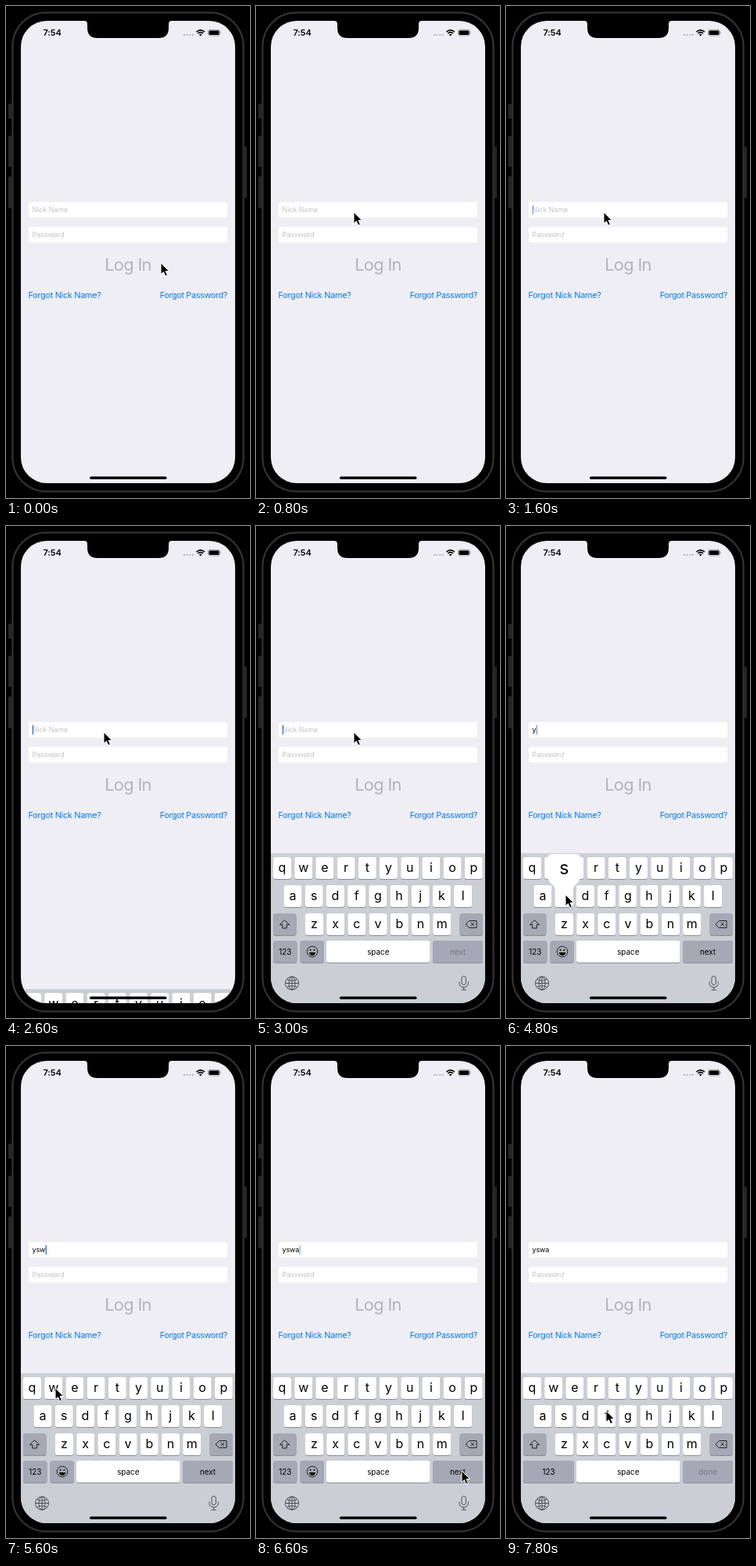
Recreate the animation shown at these times as an HTML page. Size 312x630 px, loop 8000 ms.

```html
<!DOCTYPE html>
<html lang="en">
<head>
<meta charset="utf-8">
<title>Login form</title>
<style>
  html, body { margin: 0; width: 100%; height: 100%; overflow: hidden; background: #000; }
  svg { display: block; width: 312px; height: 630px; }
  text { font-family: Inter, Roboto, "Liberation Sans", sans-serif; }
  .hint { font-size: 9px; letter-spacing: -.1px; fill: #c3c3c6; }
  .link { font-size: 10.9px; letter-spacing: -.37px; fill: #0a7aed; }
  .key { font-size: 16px; text-anchor: middle; }
  .word { font-size: 9.9px; text-anchor: middle; }
  .line { fill: none; stroke: #4c4f55; stroke-width: 1; }
</style>
</head>
<body>
<svg viewBox="0 0 312 630">
  <defs>
    <clipPath id="glass"><rect x="19" y="19" width="274" height="592" rx="33"/></clipPath>
  </defs>
  <rect width="312" height="630"/>

  <!-- phone body -->
  <g fill="#252525">
    <rect x="3" y="125" width="6" height="19" rx="1"/>
    <rect x="3" y="166" width="6" height="40" rx="1"/>
    <rect x="3" y="218" width="6" height="41" rx="1"/>
    <rect x="302" y="180" width="6" height="66" rx="1"/>
  </g>
  <rect x="7" y="7" width="298" height="616" rx="44" fill="#191919"/>
  <rect x="8.5" y="8.5" width="295" height="613" rx="43" fill="#000" stroke="#333" stroke-width="2"/>

  <g clip-path="url(#glass)">
    <rect x="19" y="19" width="274" height="592" fill="#efeef4"/>
    <path d="M100 19Q104 19 104 23V28Q104 41 117 41H195Q208 41 208 28V23Q208 19 212 19Z"/>

    <!-- status bar -->
    <text x="47.5" y="38.3" font-size="11" font-weight="600" letter-spacing="-.1">7:54</text>
    <g fill="#aaa9ae">
      <circle cx="228" cy="37" r="1.1"/><circle cx="231.6" cy="37" r="1.1"/>
      <circle cx="235.2" cy="37" r="1.1"/><circle cx="238.8" cy="37" r="1.1"/>
    </g>
    <g fill="none" stroke="#000" stroke-width="1.6">
      <path d="M243.5 33.2Q248.7 28.6 253.9 33.2"/>
      <path d="M245.3 35.2Q248.7 32.2 252.1 35.2"/>
    </g>
    <path d="M246.8 36.6Q248.7 35 250.6 36.6L248.7 38.6Z"/>
    <rect x="258.5" y="30.5" width="15" height="7.6" rx="2.2" fill="none" stroke="#8b8b8f" stroke-width=".8"/>
    <rect x="259.5" y="31.5" width="13" height="5.6" rx="1.3"/>
    <path d="M274.7 33Q276 34.3 274.7 35.6Z" fill="#8b8b8f"/>

    <!-- form -->
    <rect x="29" y="251" width="254" height="20" rx="3.2" fill="#fff"/>
    <rect x="29" y="283" width="254" height="20" rx="3.2" fill="#fff"/>
    <text id="hint" class="hint" x="33.5" y="264.3">Nick Name</text>
    <text class="hint" x="33.5" y="296.3">Password</text>
    <text id="entry" x="33.5" y="264.3" font-size="9" letter-spacing="-.1"></text>
    <rect id="caret" width="1.4" height="12" rx=".5" fill="#3f6fd8"/>
    <text x="156" y="339.3" font-size="21.8" letter-spacing="-.65" text-anchor="middle" fill="#b4b3b8">Log In</text>
    <text class="link" x="28.5" y="373.5" style="letter-spacing: -.3px">Forgot Nick Name?</text>
    <text class="link" x="283" y="373.5" text-anchor="end">Forgot Password?</text>

    <g id="board">
      <rect x="19" y="419" width="274" height="200" fill="#cbced5"/>
      <g id="keys"></g>
      <!-- shift and delete -->
      <path class="line" stroke-linejoin="round" d="M36.5 504.5L42.5 510.5H39.3V515H33.7V510.5H30.5Z" style="stroke:#222"/>
      <path class="line" stroke-linejoin="round" d="M272.5 505.5H282V514.5H272.5L268 510ZM274.5 507.8L279 512.2M279 507.8L274.5 512.2" style="stroke:#222"/>
      <g id="emoji">
        <circle class="line" cx="72" cy="545" r="6.8" style="stroke:#222"/>
        <circle cx="69.6" cy="543" r="1"/><circle cx="74.4" cy="543" r="1"/>
        <path d="M67.8 546H76.2Q75.4 550 72 550T67.8 546Z"/>
      </g>
      <g class="line">
        <circle cx="46" cy="585.5" r="8.5"/>
        <ellipse cx="46" cy="585.5" rx="4" ry="8.5"/>
        <path d="M46 577V594M37.5 585.5H54.5M39.5 580.5Q46 584 52.5 580.5M39.5 590.5Q46 587 52.5 590.5"/>
      </g>
      <g id="mic" class="line">
        <rect x="263" y="576.5" width="5.4" height="11" rx="2.7"/>
        <path d="M260 583.5V585.5Q260 590.5 265.7 590.5T271.4 585.5V583.5M265.7 590.5V594M262.5 594H269"/>
      </g>
      <g id="popup">
        <path id="bubble" fill="#fff"/>
        <text id="big" font-size="23" text-anchor="middle"></text>
      </g>
    </g>
    <rect x="107" y="602.5" width="98.5" height="3.4" rx="1.7"/>
  </g>

  <path id="pointer" d="M0 0V14.6L3.4 11.6L5.7 16.8L8.4 15.6L6.1 10.6H10.6Z"
        stroke="#fff" stroke-width="1" stroke-linejoin="round"/>
</svg>

<script>
const $ = id => document.getElementById(id);
const LOOP = 8000, STEP = 200;
const WHITE = "#fff", GREY = "#a4a9b5";

function add(tag, attrs, text) {
  const el = document.createElementNS("http://www.w3.org/2000/svg", tag);
  for (const name in attrs) el.setAttribute(name, attrs[name]);
  if (text) el.textContent = text;
  $("keys").append(el);
  return el;
}

function addKey(x, y, width, fill) {
  const key = add("g", {});
  key.append(
    add("rect", { x, y: y + 1, width, height: 28, rx: 3.2, fill: "#898c93" }),
    add("rect", { x, y, width, height: 28, rx: 3.2, fill })
  );
  return key;
}

// letter rows: letters, first centre, top edge
const spots = {};
[["qwertyuiop", 33.5, 424], ["asdfghjkl", 47, 460], ["zxcvbnm", 74.5, 496]].forEach(([row, first, top]) =>
  [...row].forEach((letter, i) => {
    const cx = first + i * 27.2;
    spots[letter] = [cx, top];
    addKey(cx - 11.5, top, 23, WHITE);
    add("text", { x: cx, y: top + 18.6, class: "key" }, letter);
  }));
addKey(22, 496, 29.5, GREY);
addKey(260.5, 496, 29.5, GREY);
addKey(22, 531, 30.5, GREY);
addKey(56.5, 531, 30.5, GREY);
const wide = addKey(22, 531, 65, GREY);
addKey(90, 531, 132.5, WHITE);
const action = addKey(226, 531, 64, GREY).lastChild;
const digits = add("text", { y: 548.8, class: "word" }, "123");
add("text", { x: 156.3, y: 548.5, class: "word" }, "space");
const label = add("text", { x: 258, y: 548.5, class: "word" }, "next");

// each row changes part of the state from its time on
const start = { at: [198, 329], caret: 0, text: "", drop: 200, press: "", secure: false, hit: false };
const table = [
  [400, { at: [184, 318] }],
  [600, { at: [143, 281] }],
  [800, { at: [125, 264] }],
  [1200, { caret: 1 }],
  [1600, { caret: .6 }],
  [1800, { caret: 0 }],
  [2000, { caret: .5 }],
  [2200, { caret: 1 }],
  [2600, { drop: 174 }],
  [2800, { drop: 22 }],
  [3000, { drop: 0 }],
  [3600, { at: [196, 443] }],
  [3800, { at: [170, 437] }],
  [4000, { press: "y" }],
  [4200, { press: "", text: "y" }],
  [4400, { at: [118, 457] }],
  [4600, { at: [76, 472] }],
  [4800, { press: "s", caret: .7 }],
  [5000, { press: "", text: "ys", caret: 1 }],
  [5200, { at: [63, 438] }],
  [5400, { press: "w" }],
  [5600, { press: "", text: "ysw" }],
  [5800, { at: [49, 470] }],
  [6000, { press: "a" }],
  [6200, { press: "", text: "yswa" }],
  [6400, { at: [180, 518] }],
  [6600, { at: [263, 544], caret: .5 }],
  [6800, { caret: 0 }],
  [7000, { caret: 1 }],
  [7200, { hit: true }],
  [7400, { hit: false, secure: true, at: [236, 530] }],
  [7600, { at: [160, 485], caret: .6 }],
  [7800, { at: [128, 467], caret: 0 }]
];

const show = (el, on) => { el.style.display = on ? "" : "none"; };

function draw(time) {
  const s = Object.assign({}, start, ...table.filter(row => row[0] <= time).map(row => row[1]));
  $("pointer").setAttribute("transform", `translate(${s.at})`);
  $("board").setAttribute("transform", `translate(0 ${s.drop})`);
  $("entry").textContent = s.text;
  show($("hint"), !s.text);

  const end = s.text && !s.secure ? $("entry").getComputedTextLength() : 0;
  $("caret").setAttribute("x", 33.7 + end);
  $("caret").setAttribute("y", s.secure ? 287 : 255);
  $("caret").setAttribute("opacity", s.caret);

  show($("popup"), s.press);
  if (s.press) {
    const [x, y] = spots[s.press];
    $("bubble").setAttribute("d", `M${x - 16} ${y - 40}h32q4.5 0 4.5 4.5v25c0 9-9 8-9 17v18q0 3-3 3h-17q-3 0-3-3v-18c0-9-9-8-9-17v-25q0-4.5 4.5-4.5Z`);
    $("big").setAttribute("x", x);
    $("big").setAttribute("y", y - 14);
    $("big").textContent = s.press;
  }

  show(wide, s.secure);
  show($("emoji"), !s.secure);
  show($("mic"), !s.secure);
  digits.setAttribute("x", s.secure ? 54.5 : 37.2);
  action.setAttribute("fill", s.hit ? WHITE : GREY);
  label.textContent = s.secure ? "done" : "next";
  label.setAttribute("fill", s.text && !s.secure ? "#000" : "#747983");
}

let last = -1;
const begin = performance.now();
function tick() {
  const time = (performance.now() - begin) % LOOP;
  const step = Math.floor(time / STEP);
  if (step !== last) draw((last = step) * STEP);
  requestAnimationFrame(tick);
}
tick();
</script>
</body>
</html>
```
